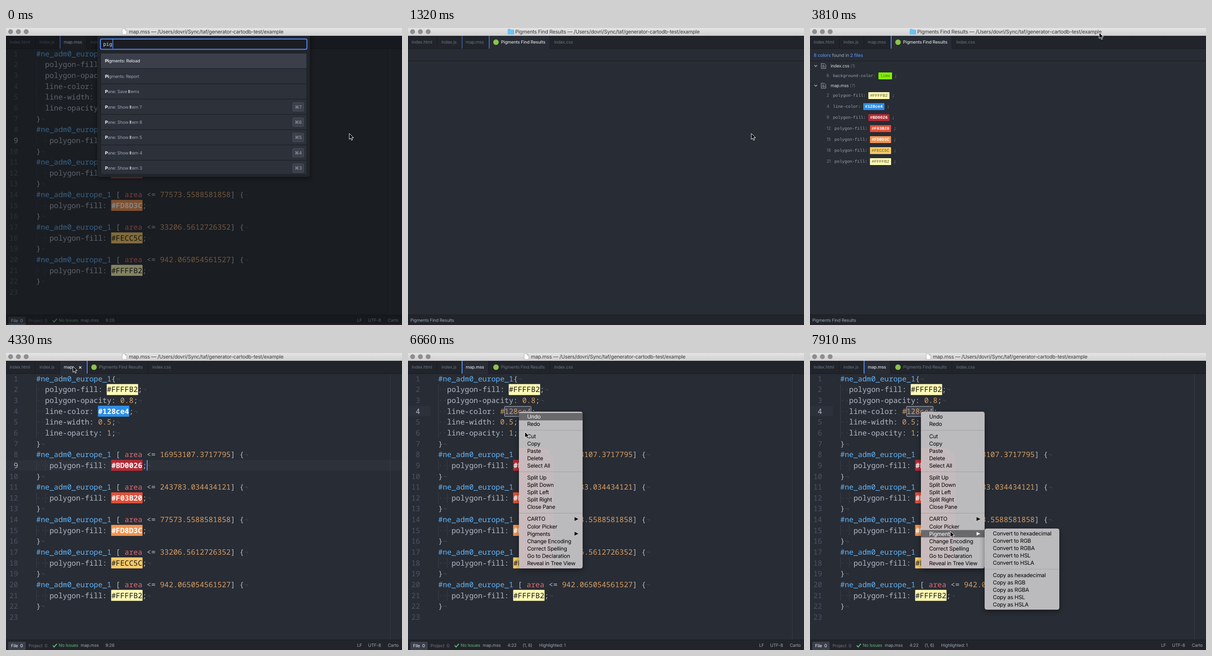
Recreate the animation shown at these times as an HTML page. Size 864 by 648 pixels, loop 8000 ms.

```html
<!DOCTYPE html>
<html lang="en">
<head>
<meta charset="utf-8">
<title>Editor session</title>
<style>
  html, body { margin: 0; width: 100%; height: 100%; overflow: hidden; background: #282c34; }
  svg { display: block; width: 864px; height: 648px; }
  text { font-family: Inter, "Open Sans", sans-serif; letter-spacing: -.02em; white-space: pre; text-rendering: geometricPrecision; }
  .code { font-family: "Noto Sans Mono", monospace; font-weight: 500; letter-spacing: 0; }
  .input { font-family: "DejaVu Sans Mono", monospace; letter-spacing: 0; }
  .cell { font-family: "Liberation Mono", monospace; letter-spacing: 0; }
  .key { font-family: Inter, "DejaVu Sans", sans-serif; }
  .strong { font-weight: 700; }
  .modal { filter: drop-shadow(0 2px 5px rgba(0,0,0,.5)); }
  .menu { filter: drop-shadow(0 4px 6px rgba(0,0,0,.4)); }
</style>
</head>
<body>
<svg id="stage" viewBox="0 0 864 648">
  <defs>
    <linearGradient id="bar" x2="0" y2="1"><stop stop-color="#e6e5e6"/><stop offset="1" stop-color="#d0cfd0"/></linearGradient>
    <linearGradient id="glow" x2="1" y2="0"><stop stop-color="#d9bcbc" stop-opacity=".5"/><stop offset="1" stop-color="#d9bcc0" stop-opacity=".25"/></linearGradient>
  </defs>
  <g id="view"></g>
</svg>
<script>
const LOOP = 8000;
const UI = 9.54, CODE = 16.07, COL = CODE * .6, LEFT = 66, ROW = 23.64;
const C = { bg: '#282c34', bar: '#21252b', line: '#181a1f', text: '#b4bbc8', ui: '#9da5b4', dim: '#6b7280',
  faint: '#414854', bright: '#d7dae0', blue: '#61b3f6', accent: '#568af2', num: '#d9a066', red: '#e06c75', green: '#5fb87a' };
const SHADE = { '#FFFFB2': '#fefab6', '#128ce4': '#2d8ee4', '#BD0026': '#b22a35', '#F03B20': '#e14f38',
  '#FD8D3C': '#f1944e', '#FECC5C': '#f6ca68', lime: '#80f702' };
const DARK_TEXT = ['#FFFFB2', '#FECC5C', 'lime'];

// Markup helpers; text is placed by its vertical centre.
const esc = s => s.replace(/&/g, '&amp;').replace(/</g, '&lt;');
const rect = (x, y, w, h, fill, more = '') => `<rect x="${x}" y="${y}" width="${w}" height="${h}" fill="${fill}" ${more}/>`;
const path = (d, more) => `<path d="${d}" ${more}/>`;
const rawText = (x, y, body, fill, size = UI, more = '') =>
  `<text x="${x}" y="${y + size * .36}" fill="${fill}" font-size="${size}" ${more}>${body}</text>`;
const text = (x, y, s, ...rest) => rawText(x, y, esc(s), ...rest);
const span = (s, fill, weight = 400) => `<tspan fill="${fill}" font-weight="${weight}">${esc(s)}</tspan>`;

// Pointer stops: time, x, y.
const STOPS = [
  [0, 749, 230], [1670, 748, 231], [2210, 742, 245], [2300, 705, 258], [2400, 640, 236], [2470, 570, 180], [2560, 500, 126],
  [2740, 420, 108], [2830, 325, 98], [2920, 310, 120], [3010, 304, 150], [3100, 300, 190], [3190, 300, 240], [3270, 302, 285],
  [3360, 306, 296], [3450, 320, 250], [3540, 345, 186], [3630, 470, 110], [3720, 600, 40], [3810, 631, 10],
  [3980, 520, 16], [4070, 330, 23], [4160, 190, 28], [4250, 146, 29], [4560, 190, 60], [4650, 300, 110], [4740, 420, 170],
  [4830, 510, 215], [4920, 490, 230], [5010, 420, 220], [5100, 350, 190], [5190, 290, 155], [5270, 255, 135], [5360, 242, 127],
  [6660, 255, 172], [6750, 262, 200], [6840, 268, 235], [6930, 272, 254], [7110, 275, 266], [7200, 279, 284], [7290, 284, 310],
  [7380, 289, 336], [7470, 295, 362], [7560, 300, 378], [7650, 304, 386], [7740, 306, 389]
];
const pointerAt = t => STOPS.filter(s => s[0] <= t).pop() || STOPS[0];

function titleBar(found) {
  const name = found ? 'Pigments Find Results' : 'map.mss';
  const icon = found
    ? path('M218 3.5q0-1 1-1h4l1.5 1.5h5.5q1 0 1 1v7.5q0 1-1 1h-11q-1 0-1-1z', 'fill="#69c5f3" stroke="#4ba9dc" stroke-width=".6"')
    : path('M253.5 1.5h6.5l3.5 3.5v9h-10zM260 1.5v3.5h3.5', 'fill="#fff" stroke="#9a9a9a" stroke-width=".7"');
  return rect(0, 0, 864, 17, 'url(#bar)') +
    [10, 27, 44].map(x => `<circle cx="${x}" cy="8" r="5" fill="#8f8e8f" stroke="#7c7b7c" stroke-width=".5"/>`).join('') + icon +
    text(found ? 234 : 268, 8, name + ' — /Users/dovri/Sync/taf/generator-cartodb-test/example', '#3b3b3b', 11.1);
}

function tabs(t, modal, found, hover) {
  const label = (x, s, on) => text(x, 31, s, on ? C.bright : C.dim, UI, on ? 'font-weight="500"' : '');
  const edge = x => rect(x, 17, 1, 28, C.line);
  const mark = (x, o = 1) => rect(x, 17, 2, 28, C.accent, `opacity="${o}"`);
  let s = rect(0, 17, 864, 28, C.bar) + rect(0, 44.5, 864, 1, C.line) + edge(63) + edge(117) + edge(175);
  s += found ? rect(177, 17, 132, 29, C.bg) : rect(118, 17, 57, 29, C.bg);
  s += label(8, 'index.html') + label(73, 'index.js') + label(126, hover ? 'map.' : 'map.mss', !found);
  if (hover) s += path('M159.5 29l5 5m0-5l-5 5', `stroke="${C.bright}" stroke-width="1.5"`);
  if (modal) return s + label(184, 'index.css') + mark(117);
  s += edge(309) + `<circle cx="192" cy="31" r="6" fill="#8bc34a"/>` + label(203, 'Pigments Find Results', found) + label(319, 'index.css');
  if (t < 1410) return s + mark(117, .5) + mark(176, .7);
  return s + mark(t < 4420 ? 176 : 117);
}

function status(t, found) {
  let s = rect(0, 626, 864, 20, C.bar) + rect(0, 625.5, 864, 1, C.line) + rect(0, 645, 864, 3, '#2a1f29');
  if (found) return s + text(5, 638, 'Pigments Find Results', C.ui);
  s += rect(5, 630, 38, 18, '#3a3f4b', 'rx="2"') + text(11, 639, 'File  0', C.bright, UI, 'font-weight="500"') +
    text(49, 639, 'Project  0', C.dim) + path('M102 638l3 3.5l6-7', `fill="none" stroke="${C.green}" stroke-width="2"`) +
    text(115, 638, 'No Issues', C.green) + text(163, 638, 'map.mss', C.ui) +
    text(217, 638, t < 5360 ? '9:26' : '4:22', C.ui) +
    text(766, 638, 'LF', C.ui) + text(790, 638, 'UTF-8', C.ui) + text(833, 638, 'Carto', C.ui);
  if (t >= 5440) s += text(250, 638, '(1, 6)', C.ui);
  if (t >= 5620) s += text(286, 638, 'Highlighted: 1', C.ui);
  return s;
}

const RULES = [['16953107.3717795', '#BD0026'], ['243783.034434121', '#F03B20'], ['77573.5588581858', '#FD8D3C'],
  ['33206.5612726352', '#FECC5C'], ['942.065054561527', '#FFFFB2']];
const BASE = [['polygon-fill', '#FFFFB2'], ['polygon-opacity', '0.8'], ['line-color', '#128ce4'], ['line-width', '0.5'], ['line-opacity', '1']];

function editor(t, modal) {
  const picked = t >= 5440, line = t < 5360 ? 9 : 4;
  const mid = n => 56 + (n - 1) * ROW, at = col => LEFT + col * COL;
  const put = (n, col, s, fill, style = '') => text(at(col), mid(n), s, fill, CODE, `class="code ${style}"`);
  const guide = (n, col) => rect(at(col), mid(n) - 12, 1, ROW, C.faint, 'opacity=".7"');
  const prop = (n, pad, name, value) => {
    const col = pad + name.length + 2, shade = SHADE[value], end = col + value.length;
    let s = guide(n, 0) + (pad > 2 ? guide(n, 2) : '') + put(n, 0, '·'.repeat(pad), C.faint) + put(n, pad, name + ':', C.text);
    if (shade && !(picked && n === 4)) {
      const dark = DARK_TEXT.includes(value);
      s += rect(at(col) - .5, mid(n) - 12, 7 * COL + 1, 24, shade, 'rx="1"') +
        put(n, col, value, dark ? '#15150f' : '#fff', dark ? '' : 'strong');
    } else {
      if (shade) s += rect(at(col + 1), mid(n) - 10.5, 6 * COL, 22, '#3e4451', 'stroke="#b9bec8" rx="1"');
      s += put(n, col, value, C.num);
    }
    return s + put(n, end, ';', C.text) + put(n, end + 1, '¬', C.faint);
  };
  const close = n => put(n, 0, '}', C.text) + put(n, 1, '¬', C.faint);
  const name = '#ne_adm0_europe_1';

  let s = rect(0, 45, 864, 581, C.bg);
  if (!modal) s += rect(0, mid(line) - 11.5, picked ? 50 : 864, 23, '#2c313a');
  s += rect(838, 45, 1, 581, '#353b45');
  for (let n = 1; n <= 23; n++)
    s += text(26.5, mid(n), String(n), n === line ? C.text : '#4b5363', CODE, 'class="code" text-anchor="end"');
  s += put(1, 0, name, C.blue) + put(1, 17, '{', C.text) + put(1, 18, '¬', C.faint) + close(7);
  BASE.forEach((p, i) => s += prop(i + 2, 2, ...p));
  RULES.forEach(([size, color], i) => {
    const n = 8 + i * 3, end = 28 + size.length;
    s += put(n, 0, name, C.blue) + put(n, 18, '[', C.text) + put(n, 20, 'area', C.red) + put(n, 25, '<=', C.text) +
      put(n, 28, size, C.num) + put(n, end, '] {', C.text) + put(n, end + 3, '¬', C.faint) +
      prop(n + 1, 3, 'polygon-fill', color) + close(n + 2);
  });
  if (!modal && t < 5360) s += rect(307, mid(9) - 11.5, 2, 23, '#528bff');
  return s;
}

const ACTIONS = ['Report', 'Reload', 'Find Colors', 'Copy As Hex', 'Copy As Hsl', 'Copy As Rgb', 'Copy As Hsla', 'Copy As Rgba'];

function palette(t) {
  const query = 'pigme'.slice(0, t < 90 ? 3 : t < 420 ? 4 : 5);
  const chosen = t < 600 ? 0 : t < 1050 ? 1 : 2;
  // Text between stars is the matched part.
  const items = t < 90
    ? ['*Pi*gments: Reload', '*Pi*gments: Report', '*P*ane: Save *I*tems', ...[7, 6, 5, 4, 3].map(n => `*P*ane: Show *I*tem ${n}`)]
    : ACTIONS.map(a => `*${'Pigments'.slice(0, query.length)}*${'Pigments'.slice(query.length)}: ${a}`);
  let s = rect(0, 17, 864, 628, '#0c0e10', 'opacity=".5"') +
    path('M199 17H663V320q0 5-5 5H204q-5 0-5-5z', `fill="${C.bar}" class="modal"`) +
    rect(206, 24, 450.5, 22.5, '#1b1d23', `rx="3" stroke="${C.accent}" stroke-width="2"`) +
    text(212, 35, query, C.bright, 11, 'class="input"');
  if (t < 870) s += rect(212.5 + query.length * 6.62, 25, 1.5, 20, '#528bff');
  s += rect(206, 55, 450, 263.5, C.line);
  items.forEach((item, i) => {
    const top = 55.5 + i * 33.37, y = top + 16.5, on = i === chosen;
    s += rect(207, top, 448.5, i === 7 ? 29.5 : 32.4, on ? '#3a3f4a' : '#2c313a') +
      rawText(216, y, item.split('*').map((p, k) => span(p, k % 2 ? '#fff' : on ? C.bright : C.ui, k % 2 ? 700 : on ? 500 : 400)).join(''), C.ui);
    if (t < 90 && i > 2)
      s += rect(625.5, y - 9.5, 24, 19, '#3b404a', 'rx="2.5" stroke="#4a505c"') +
        text(637.5, y, '⌘' + (10 - i), '#9aa2b0', 9.8, 'text-anchor="middle" class="key"');
  });
  return s;
}

const HITS = [[104, 6, 'background-color', 'lime'], [147, 2, 'polygon-fill', '#FFFFB2'], [171, 4, 'line-color', '#128ce4'],
  ...RULES.map((r, i) => [195 + i * 24, 9 + i * 3, 'polygon-fill', r[1]])];

function results(t, py) {
  let s = rect(0, 45, 864, 581, C.bg) + rect(0, 71.5, 864, 1, C.line);
  if (t < 1580) return s;
  const file = (y, name, count) =>
    path(`M9.5 ${y - 2}l3 3l3-3`, `fill="none" stroke="${C.ui}" stroke-width="1.6"`) +
    path(`M24.5 ${y - 5.5}h7l3 3v8h-10zM26.5 ${y - 2}h4m-4 2.3h6m-6 2.3h6`, `fill="none" stroke="${C.ui}"`) +
    rawText(45, y, span(name, C.bright) + span(` (${count})`, C.dim), C.ui);
  s += rawText(8, 59, span('8 colors', C.accent, 500) + span(' found in ', C.ui) + span('2 files', C.accent, 500), C.ui, 10.1);
  if (t < 1670) return s;
  s += file(83, 'index.css', 1) + file(126, 'map.mss', 7);
  HITS.forEach(([y, n, name, value]) => {
    const x = n > 9 ? 53.5 : 50, adv = 9.2 * .6, box = x + (name.length + 2) * adv, w = value.length * adv + 7.5;
    const dark = DARK_TEXT.includes(value);
    const mono = (px, str, fill, style = '') => text(px, y, str, fill, 9.2, `class="cell ${style}"`);
    if (t >= 2210 && Math.abs(py + 5 - y) < 12) s += rect(22, y - 11.5, 834, 24, '#31363f');
    s += text(36, y, String(n), '#737c8c') + mono(x, name + ':', C.ui) + rect(box, y - 7, w, 15, SHADE[value], 'rx="1"') +
      mono(box + 3.7, value, dark ? '#5b5a2c' : '#fff', dark ? '' : 'strong') + mono(box + w + 5.5, ';', C.ui);
  });
  return s;
}

// Empty entries are separators.
const MAIN = 'Undo,Redo,,Cut,Copy,Paste,Delete,Select All,,Split Up,Split Down,Split Left,Split Right,Close Pane,,CARTO,Color Picker,Pigments,Change Encoding,Correct Spelling,Go to Declaration,Reveal in Tree View'.split(',');
const KINDS = ['hexadecimal', 'RGB', 'RGBA', 'HSL', 'HSLA'];
const SUB = [...KINDS.map(k => 'Convert to ' + k), '', ...KINDS.map(k => 'Copy as ' + k)];

function menu(x, y, w, h, items, py, tint) {
  let s = rect(x, y, w, h, '#bbbabd', 'rx="4.5" class="menu"'), mid = y + 11;
  if (tint) s += path(`M${x} 207h52q24 6 24 36v${y + h - 243}H${x + 4}q-4 0-4-4z`, 'fill="url(#glow)"');
  items.forEach(item => {
    if (!item) {
      s += rect(x, mid - 3, w, 1, '#a2a1a4');
      mid += 10.2;
      return;
    }
    const on = Math.abs(py - mid) <= (mid === y + 11 ? 12 : 8), ink = on ? '#fff' : '#000';
    if (on) s += rect(x, mid - 8, w, 16, '#69696c');
    s += text(x + 18, mid, item, ink, 11.9);
    if (item === 'CARTO' || item === 'Pigments') s += path(`M${x + 121.5} ${mid - 4}l8 4l-8 4z`, `fill="${ink}"`);
    mid += 16.05;
  });
  return s;
}

function pointer(x, y, kind) {
  const shapes = {
    arrow: ['M0 0V13L3 10.2L5 15L7.2 14L5.2 9.4H9.3Z', '#000', '#fff'],
    link: ['M1 1H9V9L7 6.5C4.5 8 4.5 11 6.5 13.5H2C0 9 1.5 6 4.5 4Z', '#111', '#fff'],
    beam: ['M-2-7q2 0 2 1q0-1 2-1M0-6V6M-2 7q2 0 2-1q0 1 2 1', 'none', '#d5d8de']
  };
  const [d, fill, stroke] = shapes[kind];
  return `<g transform="translate(${x} ${y})">${path(d, `fill="${fill}" stroke="${stroke}" stroke-width="1"`)}</g>`;
}

function scene(t) {
  const modal = t < 1320, found = !modal && t < 4250, open = t >= 6660;
  const [, x, y] = pointerAt(t);
  const hover = !modal && !found && t < 4560;
  const overRow = found && t >= 2210 && HITS.some(h => Math.abs(y + 5 - h[0]) < 12);
  const beam = !modal && !found && !open && y > 45;
  let s = (found ? results(t, y) : editor(t, modal)) + tabs(t, modal, found, hover) + status(t, found);
  if (modal) s += palette(t);
  s += titleBar(t >= 1230 && t < 4250);
  // The highlight trails the pointer by one step.
  if (open) s += menu(242, 128, 139, 342, MAIN, pointerAt(t - 90)[2], true);
  if (t >= 7740) s += menu(381, 383, 163, 177, SUB, -99);
  return s + pointer(x, y, overRow ? 'link' : beam ? 'beam' : 'arrow');
}

const view = document.getElementById('view');
let shown = '';
function tick(now) {
  const s = scene(now % LOOP);
  if (s !== shown) view.innerHTML = shown = s;
  requestAnimationFrame(tick);
}
tick(performance.now());
</script>
</body>
</html>
```
